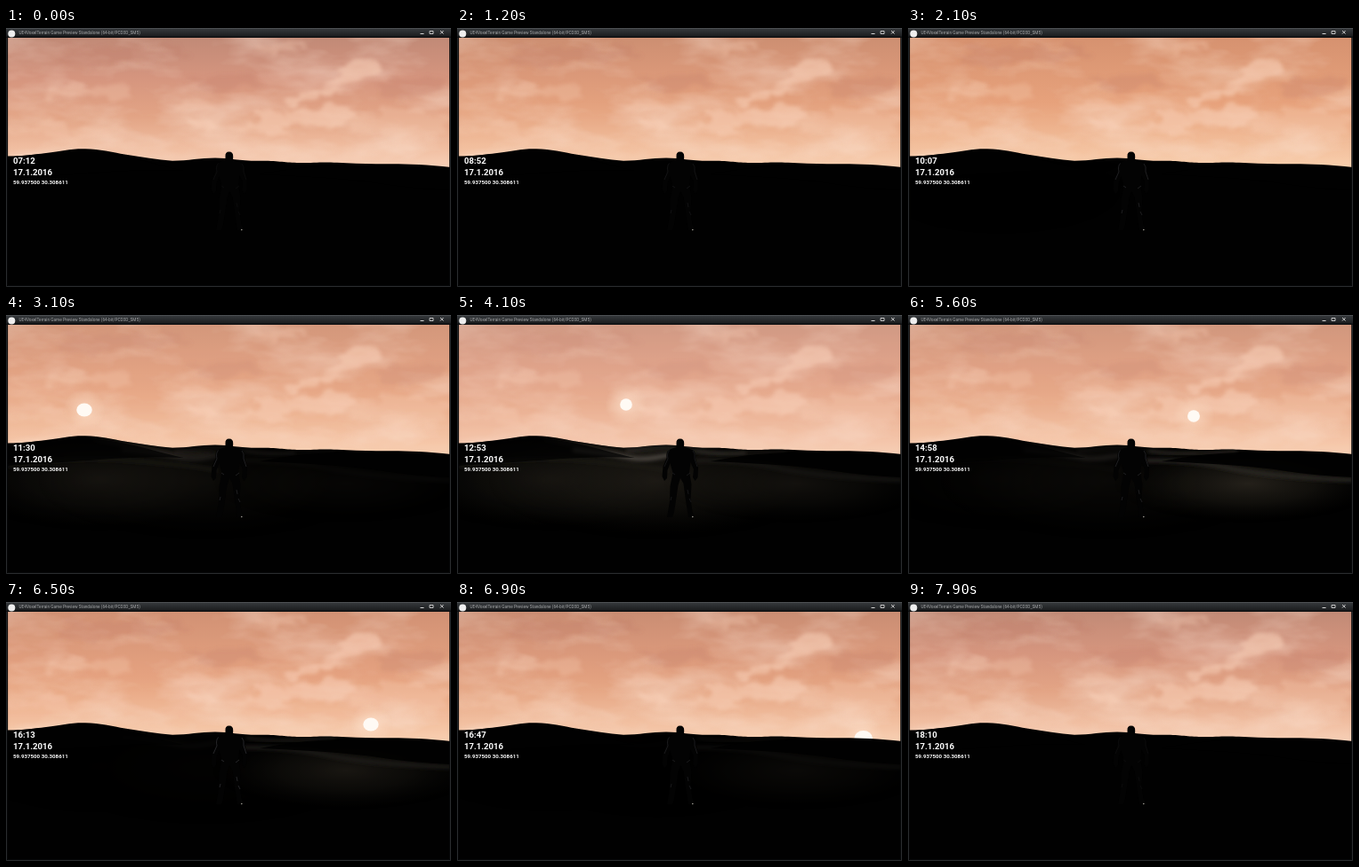
Write an HTML page that moves like this. It is 500 px wide and 292 px high and loops after 8000 ms.

```html
<!DOCTYPE html>
<html lang="en">
<head>
<meta charset="utf-8">
<title>Day cycle</title>
<style>
html, body { margin: 0; width: 100%; height: 100%; overflow: hidden; background: #000; }
svg { display: block; width: 100vw; height: 100vh; }
text { font-family: Roboto, "Open Sans", sans-serif; }
.hud { fill: #fff; font-weight: 700; font-size: 9.6px; }
.hud .small { font-size: 6.18px; }
.layer { animation: 8s linear infinite both; }
.warm { animation-name: warm; }
.pale { animation-name: pale; }
.west { animation-name: west; }
.mid { animation-name: mid; }
.east { animation-name: east; }
.rim { animation-name: rim; }
@keyframes warm { 0%, 100% { opacity: .1 } 12% { opacity: .5 } 26% { opacity: 1 } 39% { opacity: .6 } 51% { opacity: .3 } 70% { opacity: .5 } 81% { opacity: .7 } 92% { opacity: .2 } }
@keyframes pale { 0%, 26%, 100% { opacity: 0 } 39% { opacity: .5 } 51% { opacity: .8 } 70% { opacity: .5 } 85% { opacity: 0 } }
@keyframes west { 0%, 26%, 100% { opacity: 0 } 39% { opacity: .8 } 51% { opacity: .9 } 63% { opacity: .4 } 75% { opacity: .05 } }
@keyframes mid { 0%, 28%, 100% { opacity: 0 } 39% { opacity: .4 } 51% { opacity: 1 } 62% { opacity: .7 } 70% { opacity: .35 } 82% { opacity: .08 } 88% { opacity: 0 } }
@keyframes east { 0%, 30%, 100% { opacity: 0 } 39% { opacity: .2 } 51% { opacity: .5 } 70% { opacity: 1 } 81% { opacity: .7 } 90% { opacity: 0 } }
@keyframes rim { 0%, 100% { opacity: .2 } 12% { opacity: .3 } 26% { opacity: .7 } 39% { opacity: .7 } 51% { opacity: .5 } 70% { opacity: .7 } 81% { opacity: .9 } 92% { opacity: .25 } }
</style>
</head>
<body>
<svg viewBox="0 0 500 292" preserveAspectRatio="none">
  <defs>
    <linearGradient id="sky" x2="0" y2="1">
      <stop offset="0" stop-color="#bf8978"/>
      <stop offset=".3" stop-color="#d49580"/>
      <stop offset=".6" stop-color="#e2a486"/>
      <stop offset=".85" stop-color="#f1bfa3"/>
      <stop offset="1" stop-color="#f8d2bb"/>
    </linearGradient>
    <linearGradient id="warmSky" x2="0" y2="1">
      <stop offset="0" stop-color="#d7936f"/>
      <stop offset=".5" stop-color="#e8a37b"/>
      <stop offset="1" stop-color="#fad0ae"/>
    </linearGradient>
    <linearGradient id="bar" x2="0" y2="1">
      <stop offset="0" stop-color="#5a5d60"/>
      <stop offset=".12" stop-color="#34373a"/>
      <stop offset=".8" stop-color="#1d1f21"/>
      <stop offset="1" stop-color="#08090a"/>
    </linearGradient>
    <radialGradient id="glow">
      <stop offset=".2" stop-color="#ffe4cf" stop-opacity=".5"/>
      <stop offset="1" stop-color="#ffe0c8" stop-opacity="0"/>
    </radialGradient>
    <radialGradient id="soil">
      <stop offset="0" stop-color="#25211b"/>
      <stop offset=".5" stop-color="#191712" stop-opacity=".7"/>
      <stop offset="1" stop-color="#0b0a08" stop-opacity="0"/>
    </radialGradient>
    <filter id="wisp" x="-20%" y="-40%" width="140%" height="180%">
      <feTurbulence type="fractalNoise" baseFrequency=".035 .06" numOctaves="4" seed="8"/>
      <feDisplacementMap in="SourceGraphic" scale="32" xChannelSelector="R" yChannelSelector="G"/>
      <feGaussianBlur stdDeviation="2"/>
    </filter>
    <filter id="haze" x="0" y="0" width="100%" height="100%">
      <feTurbulence type="fractalNoise" baseFrequency=".011 .027" numOctaves="4" seed="21"/>
      <feColorMatrix values="0 0 0 0 .97  0 0 0 0 .79  0 0 0 0 .68  2.6 0 0 0 -1.1"/>
    </filter>
    <filter id="soft" x="-20%" y="-50%" width="140%" height="200%"><feGaussianBlur stdDeviation="2.2"/></filter>
    <filter id="edge"><feGaussianBlur stdDeviation=".45"/></filter>
    <clipPath id="view"><rect x="2" y="11" width="496.5" height="279.5"/></clipPath>
    <path id="land" d="M0 144.5C12 145 28 143 45 141S72 136 89 136.3 118 140 135 142.8 170 148.500 187 149.800C205 149.600 218 146.500 235 146.500S262 150 285 149.800 312 152 330 152 355 150.800 372 151.800 405 153.500 425 153.200 470 153.500 500 157V292H0Z"/>
    <clipPath id="ground"><use href="#land"/></clipPath>
  </defs>

  <g clip-path="url(#view)">
    <rect y="11" width="500" height="148" fill="url(#sky)"/>
    <rect class="layer warm" y="11" width="500" height="148" fill="url(#warmSky)"/>
    <rect y="11" width="500" height="148" filter="url(#haze)" opacity=".4"/>
    <g filter="url(#wisp)" fill="#f8d0b8">
      <g opacity=".55">
        <ellipse cx="392" cy="49" rx="36" ry="7" transform="rotate(-24 392 49)"/>
        <ellipse cx="345" cy="75" rx="36" ry="5" transform="rotate(-12 345 75)"/>
        <ellipse cx="292" cy="109" rx="38" ry="9"/>
        <ellipse cx="352" cy="98" rx="40" ry="10"/>
        <ellipse cx="218" cy="110" rx="16" ry="8"/>
      </g>
      <g opacity=".28">
        <ellipse cx="440" cy="108" rx="58" ry="18"/>
        <ellipse cx="90" cy="72" rx="48" ry="8"/>
        <ellipse cx="310" cy="24" rx="28" ry="7"/>
        <ellipse cx="60" cy="116" rx="68" ry="7"/>
        <ellipse cx="212" cy="88" rx="22" ry="5"/>
      </g>
      <g fill="#b97863" opacity=".22">
        <ellipse cx="130" cy="31" rx="75" ry="10"/>
        <ellipse cx="452" cy="67" rx="38" ry="9"/>
        <ellipse cx="250" cy="62" rx="45" ry="8"/>
      </g>
    </g>
    <rect class="layer pale" y="11" width="500" height="148" fill="#f3c9b5" fill-opacity=".28"/>
    <g id="sun">
      <circle r="24" fill="url(#glow)"/>
      <ellipse id="disc" fill="#fffaf4" filter="url(#edge)"/>
    </g>

    <use href="#land" fill="#010101"/>
    <g clip-path="url(#ground)">
      <g class="layer west">
        <ellipse cx="105" cy="185" rx="165" ry="58" fill="url(#soil)" opacity=".75"/>
        <path d="M92 140Q142 143 187 153L238 154Q210 164 172 157T92 140Z" fill="#25231f" filter="url(#soft)"/>
        <path d="M2 171Q70 158 150 165T238 176" fill="none" stroke="#24211c" stroke-width="3" filter="url(#soft)"/>
      </g>
      <g class="layer mid">
        <ellipse cx="225" cy="187" rx="190" ry="66" fill="url(#soil)" opacity=".75"/>
        <path d="M130 152Q175 157 194 161T245 156" fill="none" stroke="#55504a" stroke-width="4" filter="url(#soft)"/>
        <path d="M190 153Q228 147 265 153T325 155" fill="none" stroke="#393530" stroke-width="2.500" filter="url(#soft)"/>
      </g>
      <g class="layer east">
        <ellipse cx="382" cy="190" rx="150" ry="44" fill="url(#soil)"/>
        <path d="M267 164Q313 163 352 171T430 182 500 186" fill="none" stroke="#2d2a25" stroke-width="4" filter="url(#soft)"/>
        <path d="M270 153Q294 157 327 156T370 153" fill="none" stroke="#35312c" stroke-width="2.500" filter="url(#soft)"/>
      </g>
      <g fill="#020202" filter="url(#edge)">
        <path d="M0 145Q45 142 89 137.500 130 143 160 151T200 161Q158 159 118 162T0 170Z" opacity=".75"/>
        <path d="M285 165Q320 158 352 156T425 154 500 158V183Q455 181 418 175T285 165Z" opacity=".9"/>
      </g>
    </g>

    <g fill="#030303">
      <path d="M246.500 145Q246 139.500 250.700 139.500T255.200 145L255 149Q261 150 265.500 152.500 268.500 155 268 162L271 172 270.500 183 267.500 187 265 183 266 174 262.500 166 261 177 263.500 191 262.500 207 264.500 222 267.500 228H260L257 209 254.500 190 251 184 248.500 192 246 209 244 222 242 228H236L239 210 239.500 193 242.500 178 239.500 167 236.500 175 236 184 233 187 230.500 182 231.500 171 235.500 161Q234.500 154 238.500 152T246.500 149Z"/>
      <g class="layer rim" fill="none" stroke="#37373a" stroke-width=".8" filter="url(#edge)">
        <path d="M238.500 152.500Q235.500 156 237 162L233 171M265 153Q268 156 267 162L270 171"/>
        <path d="M242 178L245 180M258 181L262 178M259 197L260 202M261 207L263 211M241 205L240 209"/>
      </g>
    </g>
    <circle cx="264.800" cy="227.500" r=".8" fill="#aaa69d"/>

    <g class="hud">
      <text id="clock" x="8" y="152.800">07:12</text>
      <text x="8" y="166">17.1.2016</text>
      <text class="small" x="8" y="176.300">59.937500 30.308611</text>
    </g>
  </g>

  <rect width="500" height="11" fill="url(#bar)"/>
  <path d="M.5 11V291.500H499.500V11" fill="none" stroke="#292b2d"/>
  <path d="M1.700 11V290.500H498.500V11" fill="none" stroke="#0b0c0d" stroke-width=".8"/>
  <circle cx="6.300" cy="6.500" r="4" fill="#eee"/>
  <text x="14.500" y="7.300" font-size="4.750" fill="#a5a7a9">UE4VoxelTerrain Game Preview Standalone (64-bit/PCD3D_SM5)</text>
  <g fill="none" stroke="#d5d5d5">
    <path d="M465.500 6.500H469.500"/>
    <path d="M476 3.500H480V6.500H476Z" stroke-width=".9"/>
    <path d="M488 3L491.500 6.500M491.500 3L488 6.500"/>
  </g>
</svg>
<script>
const sun = document.getElementById("sun");
const disc = document.getElementById("disc");
const clock = document.getElementById("clock");
const start = performance.now();
const pad = n => String(n).padStart(2, "0");

// Cubic in Newton form over the seconds 3.1, 4.1 and 5.6
function arc(t, a, b, c, d) {
  const u = t - 3.1, v = t - 4.1, w = t - 5.6;
  return a + u * (b + v * (c + w * d));
}

function draw() {
  const step = Math.floor((performance.now() - start) / 100) % 80;
  const t = step / 10;
  const minutes = 432 + Math.floor(step * 25 / 3);
  clock.textContent = pad(Math.floor(minutes / 60)) + ":" + pad(minutes % 60);

  const up = t > 2 && t < 7.4;
  sun.setAttribute("visibility", up ? "visible" : "hidden");
  if (up) {
    const x = arc(t, 88, 102, -5.867, 3.14);
    const y = arc(t, 107, -6, 5.867, .48);
    const spread = ((x - 250) / 160) ** 2;
    sun.setAttribute("transform", `translate(${x} ${y})`);
    disc.setAttribute("rx", 6.5 + 2.2 * spread);
    disc.setAttribute("ry", 6.5 + 1 * spread);
  }
  requestAnimationFrame(draw);
}
draw();
</script>
</body>
</html>
```
